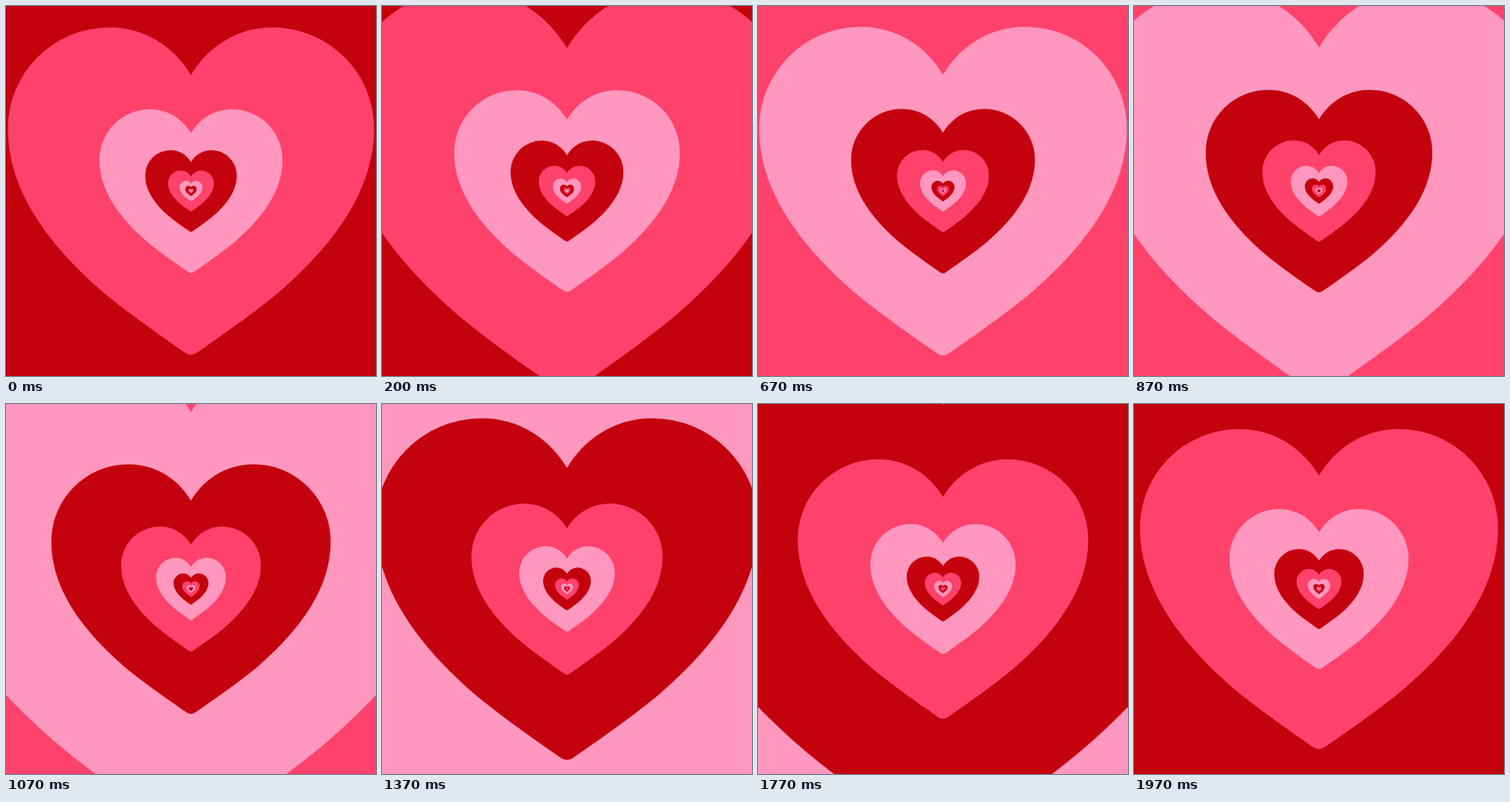
Recreate the animation shown at these times as an HTML page with a canvas. Size 480 px wide and 480 px high, loop 2010 ms.

```html
<!DOCTYPE html>
<html>
<head>
<meta charset="utf-8">
<style>
html, body { margin: 0; width: 100%; height: 100%; overflow: hidden; background: #c4020d; }
canvas { display: block; }
</style>
</head>
<body>
<canvas id="stage" width="480" height="480"></canvas>
<script>
const ctx = document.getElementById('stage').getContext('2d');
const colors = ['#ff426c', '#ff97be', '#c4020d'];
const LOOP = 2010;
const HALF_WIDTH = 237;

// Heart centred on the zoom point
const heart = new Path2D(`M0,-150
  C-20,-184 -57,-211.7 -106,-211.7
  A131,131 0 0 0 -237,-80
  C-237,-5 -190,65 -115,130
  C-88,153 -40,187 -8,209
  Q0,215 8,209
  C40,187 88,153 115,130
  C190,65 237,-5 237,-80
  A131,131 0 0 0 106,-211.7
  C57,-211.7 20,-184 0,-150Z`);

// 30 steps per second, starting at 0, 30 and 70 ms of each tenth
function stepAt(t) {
  const r = t % 100;
  return Math.min(59, 3 * Math.floor(t / 100) + (r >= 30) + (r >= 70));
}

function draw(t) {
  const zoom = 0.003 + 0.0503 * stepAt(t); // in doublings
  for (let i = -1; ; i++) {
    const scale = 2 ** (zoom - i);
    if (scale * HALF_WIDTH < 1.8) break;
    ctx.setTransform(scale, 0, 0, scale, 240, 240);
    ctx.fillStyle = colors[(i + 3) % 3];
    ctx.fill(heart);
  }
}

let start;
function tick(now) {
  start ??= now;
  draw((now - start) % LOOP);
  requestAnimationFrame(tick);
}
draw(0);
requestAnimationFrame(tick);
</script>
</body>
</html>
```
